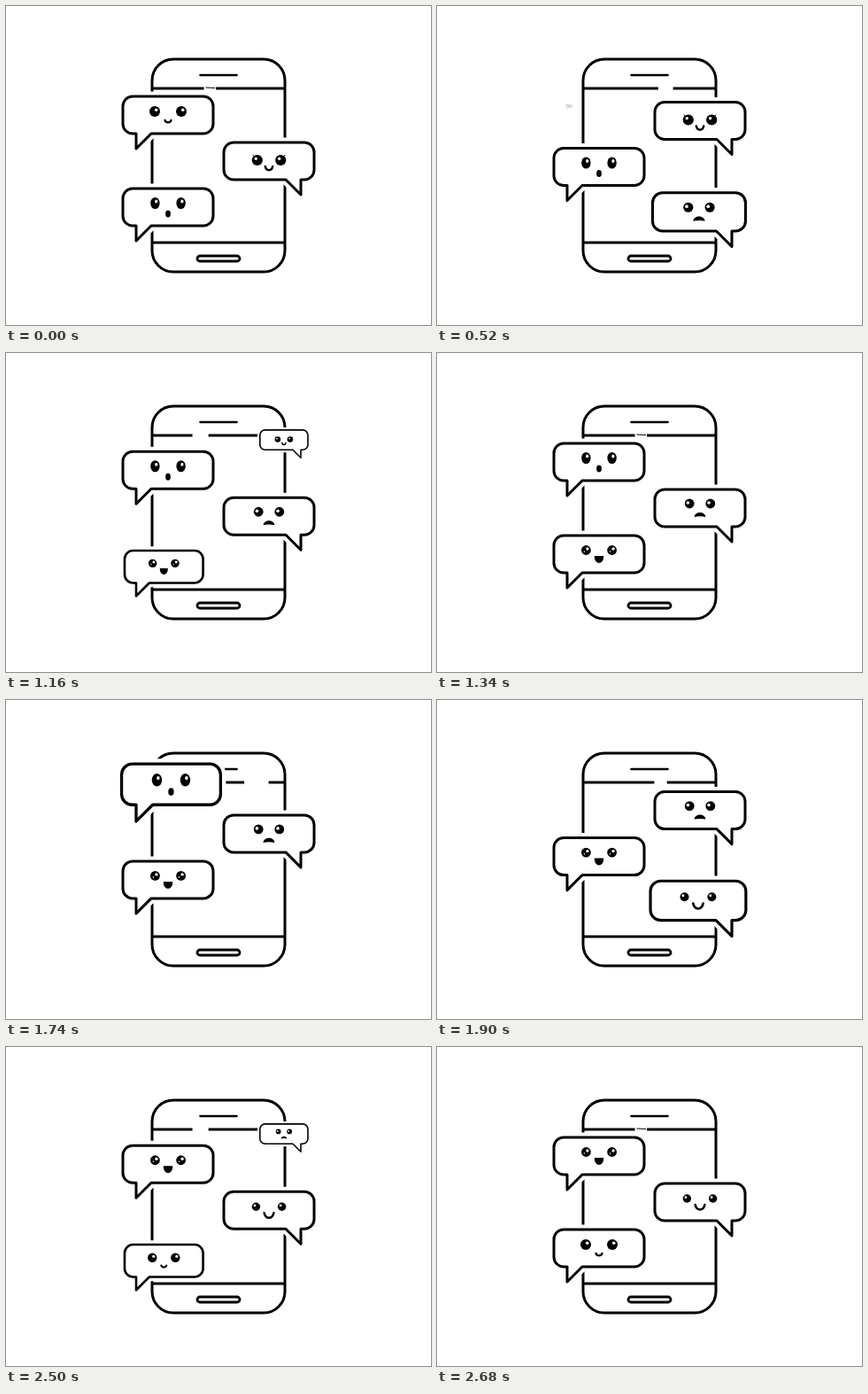
An HTML page with a canvas for the animation above (3 s loop, 480 by 360 pixels).

```html
<!DOCTYPE html>
<html lang="en">
<head>
<meta charset="utf-8">
<title>Chatting bubbles</title>
<style>
html, body { margin: 0; width: 100%; height: 100%; overflow: hidden; background: #fff; }
canvas { display: block; width: 480px; height: 360px; }
</style>
</head>
<body>
<canvas id="stage" width="480" height="360"></canvas>
<script>
const ctx = document.getElementById('stage').getContext('2d');
const LOOP = 3000, STARTS = [360, 1020, 1680, 2360], MOVE = 320, FRAME = 20;
const TOP = 102, STEP = 52, TIP_Y = 161;
const POP = 0.507, POP_DELAY = 0.297;

const clamp = v => Math.max(0, Math.min(1, v));
const easeOut = t => 1 - (1 - t) ** 3;
const backIn = t => 2.70158 * t ** 3 - 1.70158 * t ** 2;

function line(x1, y1, x2, y2, width = 3) {
  ctx.lineWidth = width;
  ctx.beginPath();
  ctx.moveTo(x1, y1);
  ctx.lineTo(x2, y2);
  ctx.stroke();
}

function box(x, y, w, h, r, width) {
  ctx.lineWidth = width;
  ctx.beginPath();
  ctx.roundRect(x, y, w, h, r);
  ctx.stroke();
}

function oval(x, y, rx, ry, color = '#000') {
  ctx.fillStyle = color;
  ctx.beginPath();
  ctx.ellipse(x, y, rx, ry, 0, 0, Math.PI * 2);
  ctx.fill();
}

// A pair of eyes, each with a highlight offset by (hx, hy)
function eyes(dx, y, rx, ry, hx, hy, hr) {
  for (const x of [-dx, dx]) {
    oval(x, y, rx, ry);
    oval(x + hx, y + hy, hr, hr * ry / rx, '#fff');
  }
}

function smile(y, half, depth, width) {
  ctx.lineWidth = width;
  ctx.beginPath();
  ctx.moveTo(-half, y);
  ctx.bezierCurveTo(-half * 0.7, y + depth, half * 0.7, y + depth, half, y);
  ctx.stroke();
}

// Faces are drawn around the top centre of their bubble
const faces = [
  function content() {
    eyes(15, 17, 6, 6, 1.7, -1.8, 1.8);
    smile(27, 3.4, 3.2, 2.4);
  },
  function flirty() {
    eyes(13.2, 20, 6.1, 6.1, -1.6, -1.8, 1.7);
    line(-16, 16.5, -18, 14.3, 1);
    line(16, 16.5, 18, 14.3, 1);
    smile(27, 4.2, 5.6, 2.5);
  },
  function amazed() {
    eyes(14.6, 16.5, 5.2, 6.6, 1.3, -2, 1.6);
    oval(0, 28.6, 2.9, 4);
  },
  function sad() {
    eyes(11.8, 16, 5.4, 5.4, -1.8, -1, 1.8);
    ctx.beginPath();
    ctx.moveTo(-6.5, 31);
    ctx.bezierCurveTo(-5.5, 24.2, 5.5, 24.2, 6.5, 31);
    ctx.quadraticCurveTo(0, 29.6, -6.5, 31);
    ctx.fillStyle = '#000';
    ctx.fill();
  },
  function laughing() {
    eyes(14.6, 16.5, 5.4, 5.4, 1.5, -1.5, 1.7);
    oval(-16.6, 18, 0.8, 0.8, '#fff');
    oval(12.6, 18, 0.8, 0.8, '#fff');
    ctx.beginPath();
    ctx.moveTo(-5.2, 23);
    ctx.lineTo(5.2, 23);
    ctx.bezierCurveTo(5.6, 33.6, -5.6, 33.6, -5.2, 23);
    ctx.fillStyle = '#000';
    ctx.fill();
  },
  function happy() {
    eyes(14.6, 17, 4.7, 4.7, -1.5, -1.3, 1.4);
    smile(24, 5.4, 7.4, 2.5);
  }
];

function bubblePath() {
  const l = 132, r = 234, b = 144, k = 11;
  ctx.beginPath();
  ctx.moveTo(l + k, TOP);
  ctx.arcTo(r, TOP, r, b, k);
  ctx.arcTo(r, b, l, b, k);
  ctx.lineTo(164, b);
  ctx.lineTo(147, TIP_Y);
  ctx.lineTo(147, b);
  ctx.arcTo(l, b, l, TOP, k);
  ctx.arcTo(l, TOP, r, TOP, k);
  ctx.closePath();
}

// slot: 0 top, 1 middle, 2 bottom; scaled around the tip of the tail
function bubble(index, slot, scale = 1) {
  if (scale < 0.01) return;
  const right = index % 2 === 1;
  const tipX = right ? 333 : 147;
  ctx.save();
  ctx.translate(tipX, TIP_Y + slot * STEP);
  ctx.scale(scale, scale);
  ctx.translate(-tipX, -TIP_Y);

  ctx.save();
  if (right) {
    ctx.translate(480, 0);
    ctx.scale(-1, 1);
  }
  bubblePath();
  ctx.strokeStyle = '#fff';
  ctx.lineWidth = 11;
  ctx.stroke();
  ctx.fillStyle = '#fff';
  ctx.fill();
  ctx.strokeStyle = '#000';
  ctx.lineWidth = 3;
  ctx.stroke();
  ctx.restore();

  ctx.translate(right ? 297 : 183, TOP);
  faces[index % faces.length]();
  ctx.restore();
}

// The upper screen line is broken near the inner corner of the top bubble
function screenLine(right, offset) {
  let from = 244 + 0.9 * offset, to = 257.5 + 1.4 * offset;
  if (!right) [from, to] = [481 - to, 481 - from];
  if (offset > 30) {
    line(165, 93, 315, 93);
    return;
  }
  line(165, 93, from, 93);
  line(to, 93, 315, 93);
  if (!right && offset < 1) line(from + 2, 92, to - 1, 92.5, 1);
}

function phone(right, offset) {
  ctx.lineCap = 'butt';
  box(165, 60, 150, 240, 24, 3);
  screenLine(right, offset);
  line(165, 267, 315, 267);
  ctx.lineCap = 'round';
  line(219.5, 78, 260.5, 78, 2.6);
  box(216, 282, 48, 6, 3, 2.8);
}

function draw(time) {
  const now = Math.floor(time % LOOP / FRAME) * FRAME;
  const turn = STARTS.filter(s => now >= s).length;
  const t = turn ? clamp((now - STARTS[turn - 1]) / MOVE) : 1;
  const rise = easeOut(t);
  const rest = 1 - rise;

  ctx.fillStyle = '#fff';
  ctx.fillRect(0, 0, 480, 360);
  ctx.strokeStyle = '#000';
  ctx.lineJoin = 'round';

  const top = t > 0 ? turn : turn - 1;
  phone(top % 2 === 1, t > 0 ? rest * STEP : 0);

  if (turn) bubble(turn - 1, -rise, 1 - backIn(clamp(t / POP)));
  bubble(turn, rest);
  bubble(turn + 1, 1 + rest);
  bubble(turn + 2, 2 + rest, 1 - backIn(1 - clamp((t - POP_DELAY) / POP)));
}

const begin = performance.now();
function tick() {
  draw(performance.now() - begin);
  requestAnimationFrame(tick);
}
tick();
</script>
</body>
</html>
```
